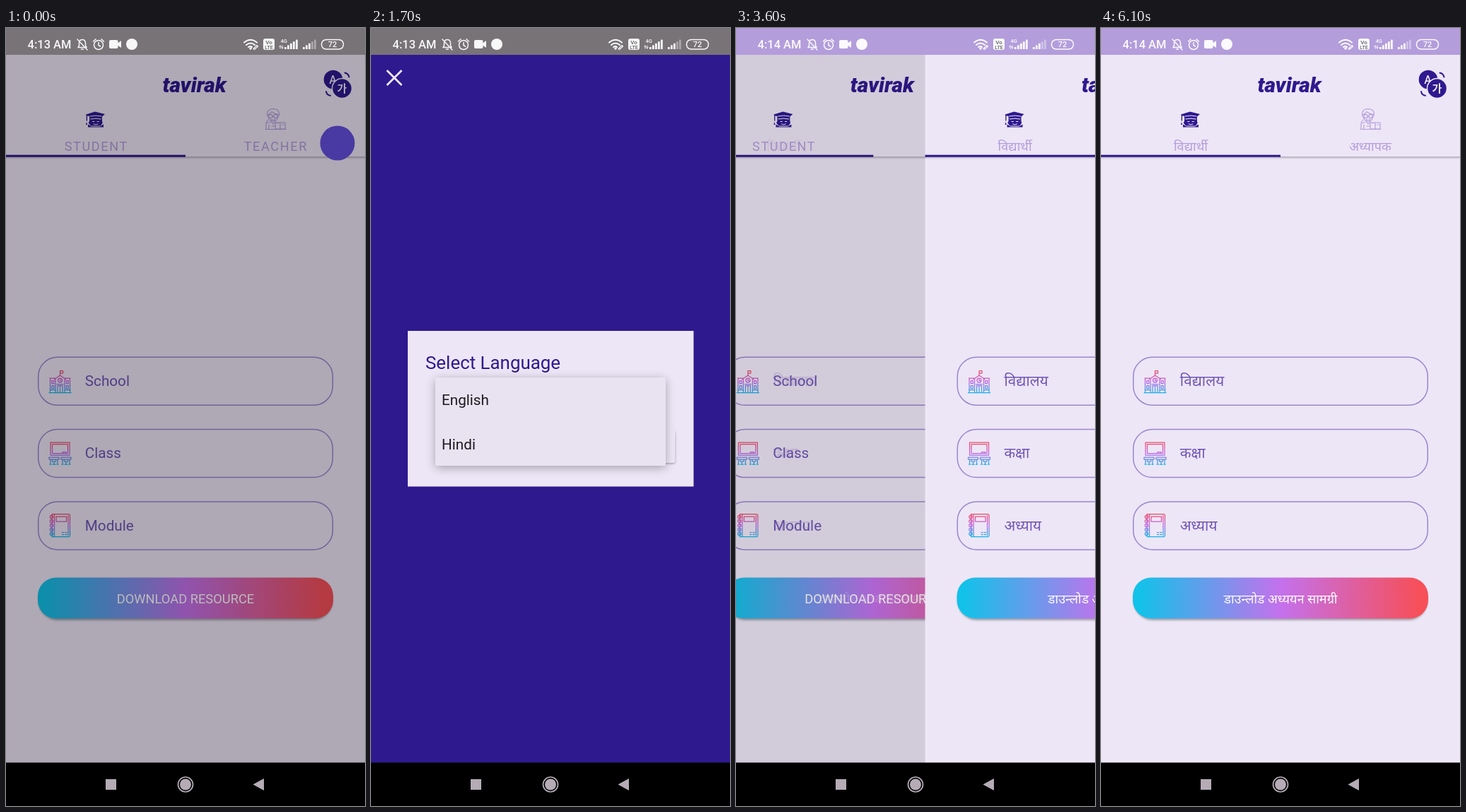
Animation of 508 by 1102 pixels, one loop 6200 ms. Source, as an HTML page:

```html
<!DOCTYPE html>
<html lang="en">
<head>
<meta charset="utf-8">
<title>Language switch</title>
<style>
html, body { margin: 0; width: 100%; height: 100%; overflow: hidden; background: #000; }
svg { display: block; width: 100vw; height: 100vh; }
text { font-family: Roboto, 'Noto Sans Devanagari', 'Noto Sans', sans-serif; white-space: pre; }
.cap { font-size: 18.1px; letter-spacing: 1.62px; }
.field { font-size: 20.7px; }
.line { fill: none; stroke-linecap: round; stroke-linejoin: round; }
</style>
</head>
<body>
<svg id="stage" viewBox="0 0 508 1102" preserveAspectRatio="none"></svg>
<script>
const LOOP = 6200, STEP = 100;
const INK = '#2e198f', PAPER = '#ede6f6', SOFT = '#b39ddb', LABEL = '#6f54b5';
const words = {
  en: { tabs: ['STUDENT', 'TEACHER'], fields: ['School', 'Class', 'Module'], button: 'DOWNLOAD RESOURCE' },
  hi: { tabs: ['विद्यार्थी', 'अध्यापक'], fields: ['विद्यालय', 'कक्षा', 'अध्याय'], button: 'डाउन्लोड अध्ययन सामग्री' }
};

const defs = `<defs>
  <linearGradient id="bar">
    <stop offset="0.02" stop-color="#12c2e9"/><stop offset=".5" stop-color="#c471ed"/><stop offset=".97" stop-color="#f64f59"/>
  </linearGradient>
  <linearGradient id="tint" gradientUnits="userSpaceOnUse" x1="0" y1="0" x2="0" y2="33">
    <stop offset="0" stop-color="#f0485c"/><stop offset=".5" stop-color="#c065e4"/><stop offset="1" stop-color="#12b4e4"/>
  </linearGradient>
  <linearGradient id="fall" x2="0" y2="1">
    <stop offset="0" stop-color="#000" stop-opacity=".25"/><stop offset="1" stop-color="#000" stop-opacity="0"/>
  </linearGradient>
  <filter id="blur" x="-20%" y="-40%" width="140%" height="180%"><feGaussianBlur stdDeviation="1.6"/></filter>
  <filter id="haze" x="-20%" y="-30%" width="140%" height="160%"><feGaussianBlur stdDeviation="7"/></filter>
  <clipPath id="reveal"><circle id="hole" cx="469" cy="163" r="24.5"/></clipPath>
  <clipPath id="view"><rect y="37" width="508" height="1004"/></clipPath>
  <g id="icon0" class="line" stroke="url(#tint)" stroke-width="1.25">
    <path d="M15.5 8V1h4v3.5h-4M7.500 13L15.500 7.500 23.500 13M9 13V32M22 13V32M0 32H31M1 11.500H9M22 11.500H30M1.500 11.500V32M29.500 11.500V32M1 28H9M22 28H30M12 32V22H19V32M15.500 22V32M11 20H20"/>
    <circle cx="15.500" cy="14.500" r="3"/><path d="M15.500 13V15H17M3.800 15h3v4h-3zM3.800 22h3v4h-3zM24.200 15h3v4h-3zM24.200 22h3v4h-3z"/>
  </g>
  <g id="icon1" class="line" stroke="url(#tint)" stroke-width="1.25">
    <path d="M2 1H29V19H2zM4.500 3.500H26.500V16.500H4.500zM19 16.500V14.500H24V16.500"/>
    <path d="M0 22H14V25H0zM17 22H31V25H17zM2 25V32M12 25V32M19 25V32M29 25V32M4.500 25V28H9.500V25M21.500 25V28H26.500V25M7 28V32M24 28V32M5 32H9M22 32H26M1 32H3M11 32H13M18 32H20M28 32H30"/>
  </g>
  <g id="icon2" class="line" stroke="url(#tint)" stroke-width="1.25">
    <path d="M4 1H28Q29.500 1 29.500 3V31Q29.500 33 28 33H4V1M7.500 1V33M27 3V31M10 4.500H24.500V11.500H10zM18.500 27H20.500M22.500 27H25M18.500 30H20.500M22.500 30H25"/>
    ${[5, 11, 17, 23, 29].map(y => `<circle cx="3.500" cy="${y}" r="2.200"/>`).join('')}
  </g>
  <g id="student" fill="${INK}">
    <path d="M0 4L13 0 27 3.500 23 7V10H5V6.500L2 5.800V13H.700V5.500z"/>
    <path d="M5 10H23V14Q24.500 15 23 17L21 20H7L4.500 17Q3 15 5 14z"/>
    <path d="M3 18L8 21H20L25 18V22H3zM1 14.500l1.200 4H0z"/>
    <path class="line" stroke="${PAPER}" stroke-width="1" d="M6 6.500Q14 4.500 22 6.500M7 10.500Q14 8.500 21 10.500M9.500 14H12M16 14H18.500M11 17.500Q14 19.500 17 17.500"/>
  </g>
  <g id="teacher" class="line" stroke="${SOFT}" stroke-width="1.150">
    <path d="M3 11Q1 1 11 .500Q21 1 19 11M3 9Q7 8 9 4.500Q13 8 19 8.500M4 11Q5 18 11 18Q17 18 18 11M8 15.500Q11 17 14 15.500"/>
    <circle cx="7.500" cy="11" r="2.600"/><circle cx="14.500" cy="11" r="2.600"/>
    <path d="M10 11H12M8 18L11 22 14 18M1 29V22Q2 20 7 19.500M15 19.500Q17 20 18 21M14 20H28V29H14zM21 20V29M0 29.500H29M5 23V29M9 25H13M24 23H26M4 16L1 20"/>
  </g>
</defs>`;

const attrs = o => Object.entries(o).map(([k, v]) => `${k}="${v}"`).join(' ');
const rect = (x, y, w, h, o = {}) => `<rect x="${x}" y="${y}" width="${w}" height="${h}" ${attrs(o)}/>`;
const text = (x, y, s, o = {}) => `<text x="${x}" y="${y}" ${attrs(o)}>${s}</text>`;
const use = (id, x, y) => `<use href="#${id}" x="${x}" y="${y}"/>`;

function labels(lang) {
  const w = words[lang], en = lang === 'en';
  const mid = { 'text-anchor': 'middle' };
  const tab = en ? { class: 'cap', fill: SOFT } : { 'font-size': 18.1, fill: SOFT };
  return w.tabs.map((s, i) => text((en ? 127.8 : 127) + 254 * i, 174, s, { ...tab, ...mid })).join('')
    + w.fields.map((s, i) => text(111.8, 507 + 102.3 * i, s, { class: 'field', fill: LABEL })).join('')
    + text(254, 814.500, w.button, { ...mid, 'font-size': en ? 18.3 : 18.1, fill: '#fff' });
}

function page(label) {
  const boxes = [0, 1, 2].map(i =>
    rect(45.7, 466.300 + 102.3 * i, 416.600, 68, { rx: 27, fill: 'none', stroke: '#9a86cf', 'stroke-width': 1.5 })
    + use('icon' + i, 61, 484.500 + (i ? 101.5 * i : 0))).join('');
  return rect(0, 37, 508, 1004, { fill: PAPER })
    + rect(0, 182, 508, 4, { fill: 'url(#fall)' })
    + rect(0, 179.700, 254, 3, { fill: INK })
    + text(266.500, 91, 'tavirak', { 'text-anchor': 'middle', 'font-size': 30, 'font-weight': 900, 'font-style': 'italic', fill: INK })
    + `<circle cx="463" cy="73" r="13.300" fill="${INK}"/>`
    + text(462.500, 79, 'A', { 'text-anchor': 'middle', 'font-size': 16, 'font-weight': 500, fill: PAPER })
    + `<circle cx="475.500" cy="85.500" r="14" fill="${INK}" stroke="${PAPER}" stroke-width="1.500"/>`
    + text(475.500, 91, '가', { 'text-anchor': 'middle', 'font-size': 15, 'font-weight': 700, fill: PAPER, style: "font-family:'Noto Sans CJK KR','Noto Sans CJK JP',sans-serif" })
    + `<path class="line" stroke="${INK}" stroke-width="2" d="M479.500 63.500Q484.500 64.500 485.500 69.500M453 90Q454 95 459 95.800"/>`
    + use('student', 113, 118.500) + use('teacher', 367, 114)
    + boxes
    + rect(46, 780, 416, 59, { rx: 27, fill: '#000', opacity: .3, filter: 'url(#blur)' })
    + rect(45, 778.500, 418, 58, { rx: 26, fill: 'url(#bar)' })
    + label;
}

function raised(x, w, s, tx) {
  return rect(x, 571, w, 46, { rx: 3, opacity: .35, filter: 'url(#blur)' })
    + rect(x, 569, w, 47, { rx: 3, fill: PAPER })
    + text(tx, 599.500, s, { class: 'cap', fill: INK });
}

const dialog = `<path class="line" stroke="${PAPER}" stroke-width="2.800" style="stroke-linecap:butt" d="M22.500 60L43.500 81M43.500 60L22.500 81"/>`
  + rect(52, 429, 404.500, 220.500, { fill: PAPER })
  + text(77, 482.500, 'Select Language', { 'font-size': 25.9, fill: INK })
  + text(100, 530.500, 'English', { id: 'choice', class: 'field', fill: '#1d1b20' })
  + '<path d="M392.500 519H406L399.250 526z" fill="#77727c"/>'
  + raised(184, 118.500, 'CANCEL', 204.300) + raised(308, 122.500, 'CHANGE', 328.300)
  + '<g id="popup">'
  + rect(91, 498, 326, 125, { opacity: .3, filter: 'url(#haze)' })
  + rect(91, 495, 326, 125, { rx: 2, fill: '#e9e2f1' })
  + rect(91, 557.500, 326, 62, { id: 'press', fill: '#000', opacity: .14 })
  + text(100, 534, 'English', { class: 'field', fill: '#1d1b20' })
  + text(100, 596.500, 'Hindi', { class: 'field', fill: '#1d1b20' }) + '</g>';

function bars(x, full, n) {
  let s = '';
  for (let i = 0; i < n; i++) {
    const h = 3 + i * 2.600;
    s += rect(x + i * 4, 30 - h, 2.800, h, { opacity: i < full ? 1 : .4 });
  }
  return s;
}

const status = rect(0, 0, 508, 38, { id: 'status' })
  + '<g fill="#fff" opacity=".95">'
  + text(30.500, 29, '4:13 AM', { id: 'clock', 'font-size': 16.5, 'font-weight': 500 })
  + `<g class="line" stroke="#fff" stroke-width="1.500">
      <path d="M102 27.500H114L112.500 25V21Q112 16.500 108 16.500T103.500 21V25zM106.500 30H109.500M101 16L115 31"/>
      <circle cx="131" cy="24" r="6.500"/><path d="M131 20.500V24.500L133.500 26M123.500 19L127 15.800M138.500 19L135 15.800"/>
      <path stroke-width="2" d="M337 20.500Q346 13 355 20.500M340 24Q346 19 352 24M343 27Q346 25 348 27"/>
      <path stroke-width="1.200" d="M350 29.500L355 24.500 356.500 26 351.500 30.500z"/>
      <rect x="446.500" y="16.500" width="31" height="13.500" rx="6.500"/>
      <path stroke-width="1" d="M388 29V25M386.800 26.300L388 25 389.200 26.300M391 25V29M389.900 27.700L391 29 392.200 27.700"/>
    </g>`
  + rect(146, 17, 12.500, 12, { rx: 2 }) + '<path d="M158 21.500L163 18V28L158 24.500z"/><circle cx="178" cy="23" r="8"/><circle cx="346" cy="29" r="1.800"/>'
  + rect(364, 15, 16, 16, { rx: 3 })
  + '<g fill="#777" font-weight="700" text-anchor="middle">' + text(372, 22.500, 'Vo', { 'font-size': 8 }) + text(372, 29.500, 'LTE', { 'font-size': 7 }) + '</g>'
  + text(388.500, 21.200, '4G', { 'font-size': 7.5, 'font-weight': 500 })
  + bars(394, 5, 5) + bars(420, 3, 5)
  + text(462, 27.300, '72', { 'font-size': 11, 'font-weight': 500, 'text-anchor': 'middle' })
  + '</g>';

const nav = rect(0, 1040.500, 508, 62)
  + rect(141, 1064, 15, 15, { fill: '#b5acb6' })
  + '<circle cx="254" cy="1071.500" r="10.500" fill="none" stroke="#b5acb6" stroke-width="1.700"/><circle cx="254" cy="1071.500" r="8" fill="#b5acb6"/>'
  + '<path d="M349.500 1071.500L365 1063V1080z" fill="#b5acb6"/>';

document.getElementById('stage').innerHTML = defs
  + '<g clip-path="url(#view)">'
  + `<g id="old">${page(`<g id="en">${labels('en')}</g><g id="hi">${labels('hi')}</g>`)}</g>`
  + rect(0, 37, 508, 1004, { id: 'dim' })
  + `<g id="sheet" clip-path="url(#reveal)">${rect(0, 37, 508, 1004, { id: 'back' })}<g id="dialog">${dialog}</g></g>`
  + `<g id="fresh">${page(labels('hi'))}</g></g>`
  + status + nav;

const el = {};
document.querySelectorAll('#stage [id]').forEach(n => el[n.id] = n);
const set = (id, k, v) => el[id].setAttribute(k, v);

// Piecewise linear value over [time, value] keys
function at(t, ...keys) {
  if (t <= keys[0][0]) return keys[0][1];
  for (let i = 1; i < keys.length; i++) {
    const [t0, a] = keys[i - 1], [t1, b] = keys[i];
    if (t <= t1) return a + (b - a) * (t - t0) / (t1 - t0);
  }
  return keys[keys.length - 1][1];
}
const mix = (a, b, p) => `rgb(${a.map((v, i) => Math.round(v + (b[i] - v) * p))})`;

function draw(t) {
  // Circular reveal of the dialog
  set('hole', 'r', at(t, [400, 24.5], [500, 110], [600, 300], [700, 525], [800, 726], [1000, 1060]));
  set('back', 'fill', mix([73, 57, 162], [46, 25, 143], at(t, [400, 0], [700, 1])));
  set('dialog', 'opacity', at(t, [500, 0], [700, 1]));
  set('sheet', 'opacity', at(t, [3100, 1], [3200, .45], [3300, .1], [3400, .02], [3500, 0]));

  // Choosing from the list
  set('popup', 'opacity', at(t, [1400, 0], [1600, 1], [2500, 1], [2600, .4], [2700, 0]));
  set('press', 'opacity', at(t, [2200, 0], [2400, .14]));
  el.choice.textContent = t < 2500 ? 'English' : 'Hindi';
  el.clock.textContent = t < 1900 ? '4:13 AM' : '4:14 AM';

  // Page change
  const gone = t < 3500 ? 0 : t >= 4400 ? 1 : 1 - Math.exp((3500 - t) / 156);
  set('old', 'transform', `translate(${-126 * gone} 0)`);
  set('fresh', 'transform', `translate(${508 * (1 - gone)} 0)`);
  set('en', 'opacity', at(t, [3600, 1], [3900, .3], [4000, 0]));
  set('hi', 'opacity', at(t, [3500, 0], [3900, .9], [4000, 1]));
  set('dim', 'opacity', t < 3500
    ? at(t, [400, .265], [600, .46], [800, .6], [3100, .6], [3200, .32], [3300, .12], [3500, 0])
    : .24 * gone);
  set('status', 'fill', mix([119, 115, 119], [179, 157, 219], at(t, [3100, 0], [3300, .6], [3500, 1])));
}

const start = performance.now();
function tick() {
  const t = (performance.now() - start) % LOOP;
  draw(Math.floor(t / STEP) * STEP);
  requestAnimationFrame(tick);
}
draw(0);
requestAnimationFrame(tick);
</script>
</body>
</html>
```
